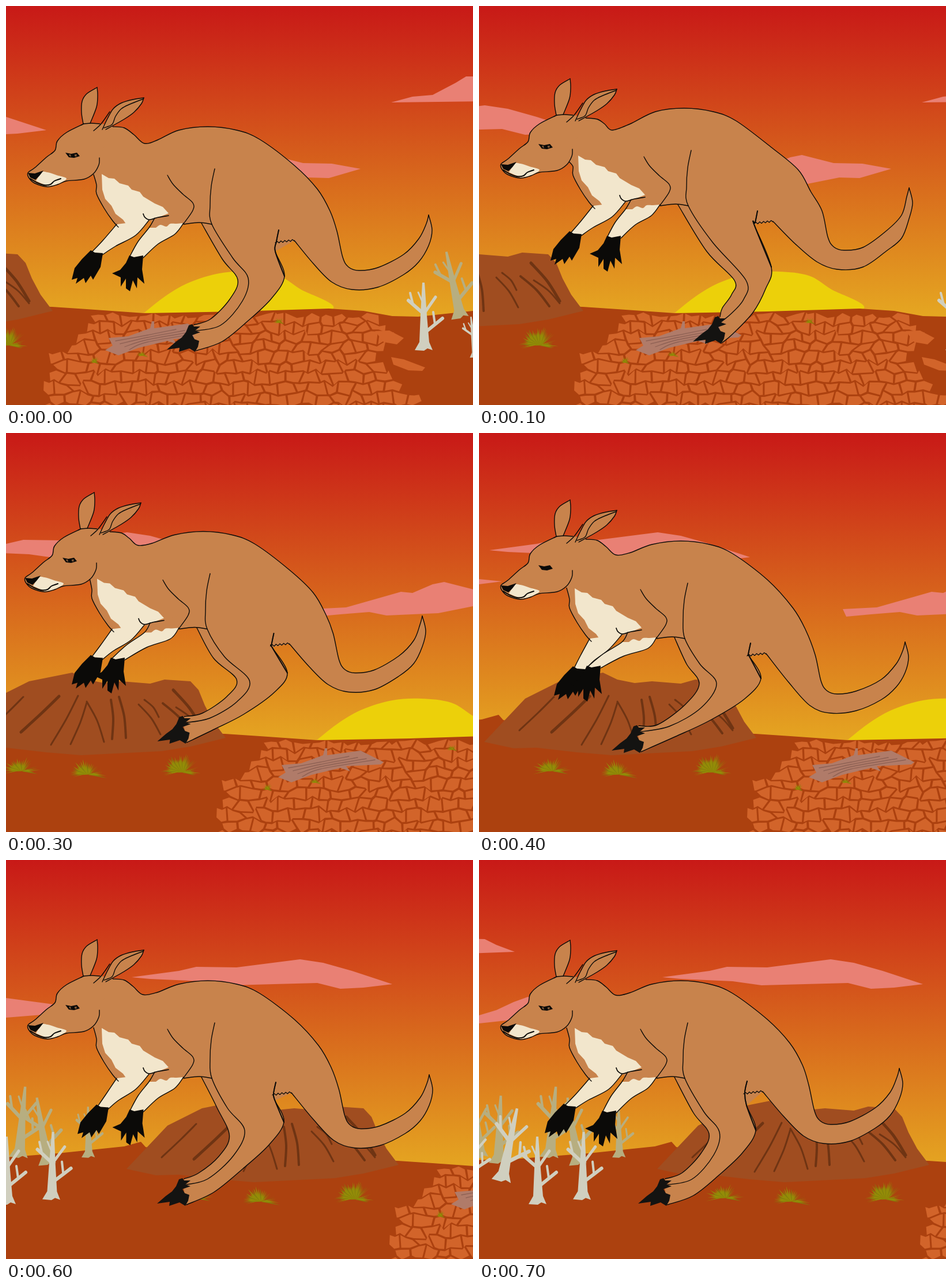
Recreate the animation shown at these times as an HTML page with a canvas. Size 810x691 px, loop 0.8 s.

```html
<!DOCTYPE html>
<html lang="en">
<head>
<meta charset="utf-8">
<title>Hopping kangaroo</title>
<style>
html, body { margin: 0; width: 100%; height: 100%; overflow: hidden; background: #ac410f; }
canvas { display: block; }
</style>
</head>
<body>
<canvas id="stage" width="810" height="691"></canvas>
<script>
const ctx = document.getElementById('stage').getContext('2d');
const FUR = '#c8834c', CREAM = '#f2e6cc', INK = '#0b0a08', CLOUD = '#e98074', MUD = '#d2642a';
const STEP = 100, STEPS = 8, SPEED = 100;

// ---------- helpers ----------
const rnd = (a, b) => {
  const v = Math.sin(a * 127.1 + b * 311.7) * 43758.5453;
  return v - Math.floor(v);
};
const mix = (a, b) => a.map((v, i) => (v + b[i]) / 2);
const mv = (off, ...p) => p.map((v, i) => v + off[i % 2]);
const flip = p => {
  const out = [];
  for (let i = p.length - 2; i >= 0; i -= 2) out.push(p[i], p[i + 1]);
  return out;
};

// Smooth curve through a flat list of points; can join an open path.
function curve(path, p, join) {
  const n = p.length / 2;
  const at = i => { i = Math.max(0, Math.min(n - 1, i)); return [p[2 * i], p[2 * i + 1]]; };
  if (join) path.lineTo(p[0], p[1]); else path.moveTo(p[0], p[1]);
  for (let i = 0; i < n - 1; i++) {
    const a = at(i - 1), b = at(i), c = at(i + 1), d = at(i + 2);
    path.bezierCurveTo(b[0] + (c[0] - a[0]) / 6, b[1] + (c[1] - a[1]) / 6,
      c[0] - (d[0] - b[0]) / 6, c[1] - (d[1] - b[1]) / 6, c[0], c[1]);
  }
}
function line(p, w = 1.4, color = INK) {
  const path = new Path2D();
  curve(path, p);
  ctx.lineWidth = w;
  ctx.strokeStyle = color;
  ctx.stroke(path);
}
function fill(color, ...parts) {
  const path = new Path2D();
  parts.forEach((p, i) => curve(path, p, i > 0));
  path.closePath();
  ctx.fillStyle = color;
  ctx.fill(path);
}
function polyPath(p) {
  const path = new Path2D();
  for (let i = 0; i < p.length; i += 2) path.lineTo(p[i], p[i + 1]);
  path.closePath();
  return path;
}
function poly(color, ...p) {
  ctx.fillStyle = color;
  ctx.fill(polyPath(p));
}

// ---------- landscape ----------
const BACK = '#b7ae80', FRONT = '#d0cfbf';
const sky = ctx.createLinearGradient(0, 0, 0, 535);
sky.addColorStop(0, '#c81917');
sky.addColorStop(.5, '#d6601c');
sky.addColorStop(1, '#e5a621');

// Dry mud: jittered bricks, each shrunk to leave a crack.
function mudPath() {
  const area = polyPath([155,535, 260,533, 560,528, 645,532, 640,550, 690,575, 650,588, 645,620, 690,655, 722,700,
    72,700, 75,668, 52,657, 75,640, 85,625, 65,608, 125,590]);
  const out = new Path2D();
  const rowY = r => 534 + r * 15.5 + r * r * .2;
  const node = (r, c) => [46 + c * 13 + (rnd(r, c) - .5) * 13, rowY(r) + (rnd(c, r + 50) - .5) * 11];
  for (let r = 0; r < 10; r++) for (let k = 0; k < 28; k++) {
    const c = 2 * k + r % 2;
    const v = [node(r, c), node(r, c + 1), node(r, c + 2), node(r + 1, c + 2), node(r + 1, c + 1), node(r + 1, c)];
    const mx = v.reduce((s, q) => s + q[0], 0) / 6, my = v.reduce((s, q) => s + q[1], 0) / 6;
    if (!ctx.isPointInPath(area, mx, my)) continue;
    v.forEach(([x, y], i) => {
      const f = 1 - 2.2 / Math.hypot(x - mx, y - my);
      out[i ? 'lineTo' : 'moveTo'](mx + (x - mx) * f, my + (y - my) * f);
    });
    out.closePath();
  }
  return out;
}
const mud = mudPath();

function tree(x, y, s, lean, color) {
  const limb = (w, ...p) => line(p, w, color);
  ctx.save();
  ctx.translate(x, y);
  ctx.rotate(lean);
  ctx.scale(s, s);
  poly(color, -16,0, -8,-14, -6,-62, -3,-117, 1,-117, 5,-60, 9,-14, 15,0, 6,-3, 0,1);
  limb(6, -4,-66, -27,-86);
  limb(4, -19,-79, -24,-99);
  limb(6, 6,-34, 32,-55);
  limb(4, 19,-45, 16,-66);
  limb(5, 2,-66, 20,-92);
  limb(3, -2,-82, -10,-100);
  ctx.restore();
}
function tuft(x, y, w, h, n) {
  for (let i = 0; i < n; i++) {
    const a = -.2 + (Math.PI + .4) * i / (n - 1), len = .65 + .35 * rnd(i, w + h);
    const bx = x + Math.cos(a) * w * .15, b = w > 20 ? 2.4 : 1.3;
    poly(i % 4 ? '#948c08' : '#837e0c', bx - b, y, bx + b, y - b, x + Math.cos(a) * w * len, y - Math.sin(a) * h * len);
  }
}
function drawClouds() {
  poly(CLOUD, -382,203, -300,192, -270,185, -200,186, -90,172, -50,178, 0,192, 70,215,
    20,221, -20,223, -60,213, -210,217, -260,210, -350,206);
  poly(CLOUD, 231,305, 290,302, 350,285, 385,275, 405,277, 440,262, 460,258, 515,272, 565,273, 615,282,
    560,298, 525,297, 490,304, 450,312, 360,316, 330,310, 280,314, 237,318);
  poly(CLOUD, -720,275, -670,260, -640,246, -615,237, -480,255, -460,246, -440,244, -400,253, -360,257,
    -400,262, -450,272, -500,265, -625,275, -720,285);
  poly(CLOUD, -720,136, -690,137, -670,147, -638,159, -720,162);
  poly(CLOUD, 668,167, 705,157, 740,154, 780,133, 798,122, 830,122, 830,165);
}
function drawRock() {
  const crack = (w, x, y, x2, y2) => line([x, y, (x + x2) / 2 + 3, (y + y2) / 2 - 2, x2, y2], w, '#6f3413');
  poly('#a04d20', -391,535, -320,460, -260,430, -185,415, -160,427, -130,433, -100,430, -50,434, -25,427, 20,430,
    34,445, 45,472, 60,500, 81,528, 20,543, -30,551, -170,558, -230,553, -300,545, -340,546);
  crack(3, -270,457, -330,515);
  crack(5, -208,456, -274,518);
  crack(3, -175,455, -222,540);
  crack(3, -160,467, -188,539);
  crack(3, -160,465, -130,535);
  crack(4, -118,462, -116,530);
  crack(4, -104,457, -92,528);
  crack(3, -70,470, -32,522);
  crack(3, -60,462, -35,492);
  crack(4, -28,468, 22,520);
  crack(5, -10,445, 40,511);
  crack(3, -5,475, 40,515);
}
function drawLog() {
  poly('#b07b69', 178,575, 212,572, 250,558, 253,546, 257,546, 257,558, 315,550, 355,570, 350,574, 290,577,
    297,586, 280,580, 230,592, 195,605, 172,596, 185,588);
  for (let i = 0; i < 4; i++) line([190 + i * 8, 580 + i * 5, 245, 570 + i * 4, 295 + i * 15, 560 + i * 2], 1.3, '#8d6053');
}
function landscape(step) {
  ctx.fillStyle = sky;
  ctx.fillRect(0, 0, 810, 691);
  ctx.save();
  ctx.translate(step * SPEED, 0);
  drawClouds();
  fill('#ecd00a', [240,531, 280,500, 320,478, 370,463, 420,460, 472,467, 510,490, 565,526, 400,545]);
  poly('#ac410f', -720,520, -640,518, -510,508, -395,496, -366,488, -358,497, -300,510, 80,521, 140,525, 240,532,
    400,529, 560,524, 620,528, 670,537, 715,538, 820,527, 820,700, -720,700);
  tree(-667, 525, 1, .05, BACK);
  tree(-697, 515, .9, -.1, BACK);
  tree(-578, 515, 1.05, .1, BACK);
  tree(-528, 527, 1, -.15, BACK);
  tree(-457, 515, .75, 0, BACK);
  tree(788, 540, 1, -.2, BACK);
  drawRock();
  ctx.fillStyle = MUD;
  ctx.fill(mud);
  poly(MUD, 640,563, 665,562, 690,575, 678,586, 655,582);
  poly(MUD, 668,608, 690,612, 727,626, 722,632, 698,631, 672,621);
  drawLog();
  tuft(3, 588, 36, 35, 44);
  tuft(-160, 592, 36, 29, 26);
  tuft(-275, 586, 36, 28, 26);
  tuft(474, 549, 12, 11, 12);
  tuft(154, 618, 10, 13, 12);
  tuft(237, 606, 12, 10, 12);
  tree(-661, 556, 1.1, .22, FRONT);
  tree(-598, 596, 1, 0, FRONT);
  tree(-521, 588, 1, .03, FRONT);
  tree(-715, 565, .9, .1, FRONT);
  tree(725, 596, 1, 0, FRONT);
  tree(814, 608, .6, -.1, FRONT);
  ctx.restore();
}

// ---------- kangaroo ----------
// body: shifts of head, torso, nape, tail, tail tip, crotch, far hand, near hand, foot.
// legs: points down the thigh front (4), thigh back (5) and far leg (4).
const pose = (body, legs) => ({ body, legs });
const between = (a, b) => pose(mix(a.body, b.body), mix(a.legs, b.legs));

const push = pose(
  [0,0, 0,0, 0,0, 0,0, 0,0, 0,0, 0,0, 0,0, 0,0],
  [393,436, 420,471, 410,511, 372,553, 467,425, 483,468, 460,507, 420,545, 375,581, 375,438, 402,474, 388,508, 355,542]);
const lift = pose(
  [0,-15, 6,-32, -9,-23, 21,-35, 13,-47, 10,-33, 10,-33, 8,-34, 92,-14],
  [405,409, 463,475, 459,508, 435,535, 477,378, 507,452, 497,490, 475,531, 440,568, 395,425, 443,475, 438,500, 422,523]);
const fly = pose(
  [-10,-51, -16,-55, -20,-60, -22,-79, -28,-90, -15,-58, -16,-58, -37,-57, 16,-77],
  [375,375, 433,425, 417,454, 376,480, 454,355, 487,406, 470,438, 425,476, 385,499, 360,380, 418,420, 408,443, 372,465]);
const reach = pose(
  [0,-25, 0,-22, -3,-27, 9,-6, 6,0, -2,-24, 16,-19, -27,-29, -49,-45],
  [383,400, 412,434, 385,476, 330,508, 469,387, 489,425, 460,461, 400,498, 340,526, 360,400, 382,434, 358,470, 310,505]);
const land = pose(
  [0,-4, 0,0, -3,-6, 9,15, 6,21, -2,-1, 20,2, 1,-2, -31,0],
  [378,423, 411,466, 382,513, 330,552, 469,408, 484,440, 455,480, 405,524, 350,569, 360,420, 376,482, 352,520, 315,543]);
const settle = pose(
  [0,-2, 0,0, -3,-4, -2,0, -4,-1, -8,-5, 0,-1, 0,2, -3,0],
  mv([-3, 0], ...push.legs));
const poses = [push, lift, fly, between(fly, reach), reach, land, between(land, settle), settle];

function drawHead(off, shut) {
  const face = [135,204, 105,219, 89,234, 85,250, 70,262, 50,280, 38,289, 40,298, 50,307, 72,313, 90,309,
    105,303, 135,300, 152,290, 161,275, 162,263];
  const ear1 = [134,204, 131,185, 132,165, 140,152, 158,141];
  const ear1b = [158,141, 159,155, 157,175, 146,203];
  const ear2 = [167,214, 176,195, 186,178, 200,168, 220,162, 239,159];
  const ear2b = [239,159, 235,169, 222,184, 205,196, 173,214];
  ctx.save();
  ctx.translate(...off);
  fill(FUR, face, [185,209, 160,203, 135,204]);
  fill(FUR, ear1, ear1b);
  fill(CREAM, [52,303, 62,288, 72,288, 88,293, 105,299, 88,309, 72,312]);
  poly(INK, 38,289, 50,290, 65,285, 58,294, 51,301, 42,297);
  line([42,299, 54,306, 66,310, 77,309, 84,303, 95,299], 2);
  line(face);
  line([135,204, 148,203, 163,204]);
  line([152,216, 165,204, 180,183]);
  line(ear1);
  line(ear1b);
  fill(FUR, ear2, ear2b);
  line(ear2);
  line(ear2b);
  line([170,211, 184,205, 190,191, 200,178, 215,170, 238,161]);
  poly(INK, 103,254, 113,256, 123,254, 128,260, 118,263, 109,262);
  if (!shut) {
    poly('#7a5435', 109,257, 112,257, 113,261, 110,260);
    poly('#7a5435', 119,257, 123,257, 122,261, 119,260);
  }
  ctx.restore();
}

function kangaroo({ body, legs }, shut) {
  const [H, T, D, R, P, C, F, N, S] = Array.from({ length: 9 }, (_, i) => body.slice(2 * i, 2 * i + 2));
  const front = [...mv(T, 362,282, 356,312, 354,345, 357,378), ...legs.slice(0, 8), ...mv(S, 324,563)];
  const back = [...mv(C, 473,388, 469,408), ...legs.slice(8, 18), ...mv(S, 330,597)];
  const far = [...mv(T, 339,376), ...legs.slice(18), ...mv(S, 326,552)];
  const spine = [...mv(H, 185,209, 205,211), ...mv(mix(H, D), 222,223), ...mv(D, 240,238), ...mv(mix(D, T), 263,232),
    ...mv(T, 300,215, 350,209, 400,215, 440,231, 500,276), ...mv(mix(T, R), 540,317, 562,355),
    ...mv(R, 574,390, 584,435, 594,452, 612,458, 645,453), ...mv(mix(R, P), 690,430, 716,403), ...mv(P, 729,377, 733,362)];
  const under = [...mv(P, 733,362, 739,388, 733,415), ...mv(mix(R, P), 716,443, 690,465),
    ...mv(R, 645,487, 600,491, 565,478), ...mv(mix(R, C), 533,446), ...mv(C, 500,406)];
  const shin = front.slice(6), rear = back.slice(4);
  const belly = [...mv(T, 357,378, 335,375, 308,378)];
  const chest = [...mv(mix(H, T), 152,292), ...mv(T, 157,310, 157,325, 170,350, 185,372, 195,383)];

  // far leg, then the whole body
  fill(FUR, far, flip(shin));
  line(far);
  fill(FUR, spine, under, rear, flip(shin), belly, mv(T, 285,382, 255,384, 249,372, 215,392), flip(chest),
    mv(H, 152,288, 162,265, 160,220));

  // far arm and chest patch
  const farTop = [...mv(T, 192,378), ...mv(mix(T, F), 168,406), ...mv(F, 149,426)];
  const farLow = [...mv(F, 167,431), ...mv(mix(T, F), 190,416), ...mv(T, 225,397, 248,371)];
  fill(CREAM, farTop, farLow);
  poly(CREAM, ...mv(T, 166,291, 178,298, 188,299, 197,307, 212,311, 218,318, 232,322, 238,330, 258,342, 272,348,
    282,359, 262,367, 249,370, 232,386, 210,395, 210,380, 203,370, 190,360, 183,346, 172,334, 167,318));
  line(farTop);
  line(farLow);

  // near arm
  const armIn = [...mv(T, 258,367, 248,384), ...mv(mix(T, N), 229,408), ...mv(N, 214,435)];
  const armOut = [...mv(N, 238,436), ...mv(mix(T, N), 264,412), ...mv(T, 293,395, 308,376)];
  poly(FUR, ...mv(T, 258,367, 282,362, 322,350, 308,378, 250,386));
  fill(CREAM, armIn.slice(2), armOut, mv(T, 296,377, 285,377, 278,382, 268,379, 260,384));
  line(armIn);
  line(armOut);
  line(mv(T, 238,360, 241,366, 249,370, 264,366, 282,363), 1.7);
  line(mv(T, 280,293, 290,309, 307,326, 324,341, 324,354, 308,377));
  line(chest);

  // hands
  poly(INK, ...mv(F, 147,423, 154,427, 168,428, 164,452, 151,474, 147,467, 138,480, 135,471, 121,481, 124,471, 114,474,
    119,454, 132,438));
  poly(INK, ...mv(N, 214,432, 222,435, 238,432, 236,456, 240,481, 228,470, 227,489, 220,475, 215,494, 208,489, 208,472,
    199,486, 199,470, 184,463, 198,457, 208,445));

  // outlines
  [spine, under, belly, front, back].forEach(p => line(p));
  line(back.slice(0, 8), 2);
  const [cx, cy] = mv(C, 467,410);
  ctx.beginPath();
  ctx.moveTo(cx, cy);
  for (let i = 1; i <= 10; i++) ctx.lineTo(cx + i * 3.3, cy - i * .4 + (i % 2 ? -2 : 1));
  ctx.lineWidth = 1.3;
  ctx.stroke();

  // foot
  poly('#141311', ...mv(S, 317,553, 323,551, 326,555, 337,555, 328,562, 337,565, 323,570, 327,577, 335,580, 333,590,
    328,599, 318,593, 300,599, 301,592, 279,595, 294,582, 305,574, 312,565));

  drawHead(H, shut);
}

// ---------- playback ----------
let shown = -1;
const start = performance.now();
function tick() {
  const step = Math.floor((performance.now() - start) / STEP) % STEPS;
  if (step !== shown) {
    shown = step;
    ctx.lineCap = ctx.lineJoin = 'round';
    landscape(step);
    kangaroo(poses[step], step === 4);
  }
  requestAnimationFrame(tick);
}
tick();
</script>
</body>
</html>
```
